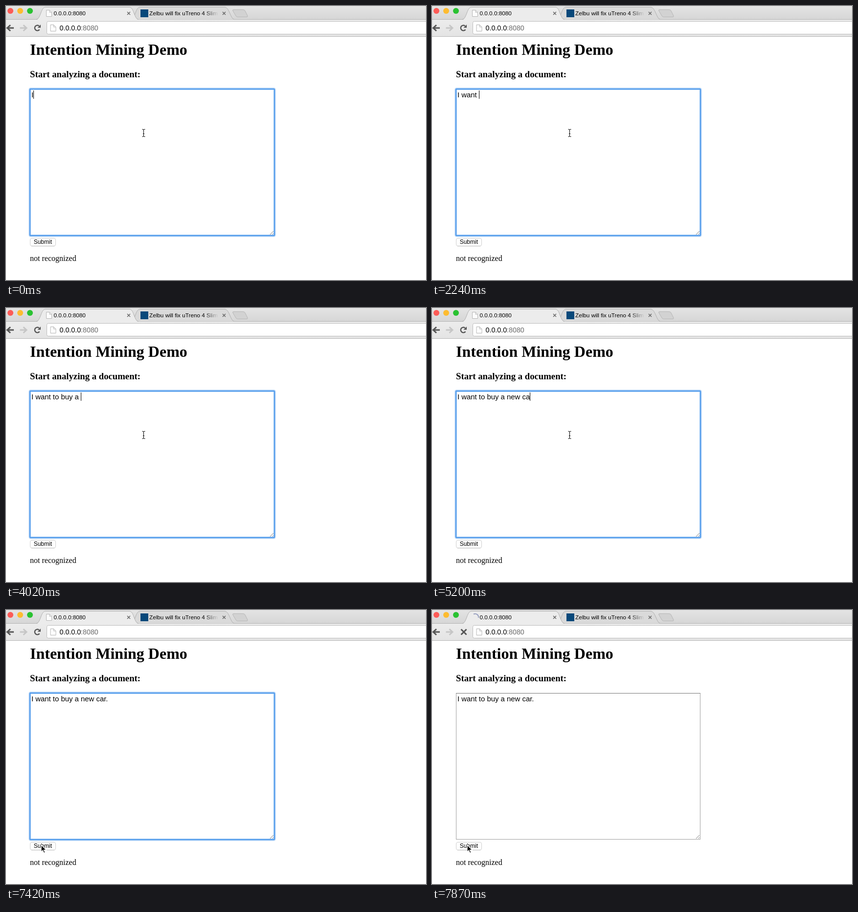
Recreate the animation shown at these times as an HTML page. Size 859 by 561 pixels, loop 8000 ms.

```html
<!DOCTYPE html>
<html lang="en">
<head>
<meta charset="utf-8">
<title>Intention Mining Demo</title>
<style>
  html, body { margin: 0; width: 100%; height: 100%; overflow: hidden; background: #fff; }
  svg { display: block; width: 859px; height: 561px; }
  text { white-space: pre; }
  .sans { font-family: "Liberation Sans", Arial, sans-serif; }
  .serif { font-family: "Liberation Serif", Times, serif; }
  .line { fill: none; }
</style>
</head>
<body>
<svg viewBox="0 0 859 561" xmlns="http://www.w3.org/2000/svg">
  <defs>
    <linearGradient id="strip" x2="0" y2="1">
      <stop offset="0" stop-color="#e4e4e4"/><stop offset="1" stop-color="#d6d6d6"/>
    </linearGradient>
    <linearGradient id="bar" x2="0" y2="1">
      <stop offset="0" stop-color="#ececec"/><stop offset="1" stop-color="#e4e4e4"/>
    </linearGradient>
    <linearGradient id="fade">
      <stop offset="0" stop-color="#dadada" stop-opacity="0"/><stop offset="1" stop-color="#dadada"/>
    </linearGradient>
    <g id="page">
      <path d="M.5 .5H7L11.5 5V13.5H.5Z" fill="#fdfdfd" stroke="#b4b4b4"/>
      <path d="M7 .5V5H11.5" class="line" stroke="#b4b4b4"/>
    </g>
    <path id="close" d="M-3-3L3 3M3-3L-3 3" class="line" stroke="#696969" stroke-width="1.6"/>
    <path id="arrow" d="M9-6L2.5 0L9 6M3 0H16" class="line" stroke-width="3"/>
  </defs>

  <rect width="859" height="561" fill="#fff"/>

  <!-- window and tabs -->
  <rect width="859" height="28" fill="url(#strip)"/>
  <rect y="28" width="859" height="35" fill="url(#bar)"/>
  <path d="M0 27.5H859" stroke="#b3b3b3"/>
  <path d="M0 62.5H859" stroke="#b5b5b5"/>
  <path d="M256 27.5C264 27 265 3 273 2.5H448C457 3 459 27 467 27.5" fill="#dadada" stroke="#b0b0b0"/>
  <path d="M62 28.5C71 27 71 3 80 2.5H253C262 3 262 27 271 28.5Z" fill="#ececec"/>
  <path d="M62 27.5C71 27 71 3 80 2.5H253C262 3 262 27 271 27.5" class="line" stroke="#b0b0b0"/>
  <path d="M465 7.5H485Q488 7.5 489 10L494 20Q495 22.5 492 22.5H474Q471 22.5 470 20L464 10Q463 7.5 465 7.5Z" fill="#d2d2d2" stroke="#b6b6b6"/>
  <circle cx="9" cy="10" r="6" fill="#fc5b57"/>
  <circle cx="29" cy="10" r="6" fill="#fdbc30"/>
  <circle cx="49" cy="10" r="6" fill="#29c231"/>
  <use href="#page" id="tabIcon" x="82" y="8"/>
  <path id="spinner" d="M-3-6.5A7 7 0 0 1 7 1" class="line" stroke="#98a0c0" stroke-width="2"/>
  <use href="#close" x="251" y="15"/>
  <use href="#close" x="446" y="15"/>
  <rect x="275" y="7" width="16" height="16" fill="#08487a"/>
  <g class="sans" font-size="11.75">
    <text x="97.5" y="19">0.0.0.0:8080</text>
    <text x="293" y="19">Zelbu will fix uTreno 4 Slim</text>
  </g>
  <rect x="405" y="6" width="30" height="18" fill="url(#fade)"/>

  <!-- toolbar -->
  <use href="#arrow" x="0" y="45" stroke="#555"/>
  <use href="#arrow" transform="translate(44.5 45) scale(-1 1)" stroke="#c6c6c6"/>
  <g id="reload">
    <path d="M68.5 48.2A5.4 5.4 0 1 1 67.6 40.8" class="line" stroke="#555" stroke-width="2.4"/>
    <path d="M71 38V44.5H64.5Z" fill="#555"/>
  </g>
  <path id="stop" d="M59.5 39.5L70.5 50.5M70.5 39.5L59.5 50.5" stroke="#555" stroke-width="3"/>
  <rect x="83.5" y="31.5" width="790" height="26" rx="3" fill="#fff" stroke="#bcbcbc"/>
  <use href="#page" x="90.5" y="38"/>
  <text class="sans" x="109.5" y="50" font-size="14.25">0.0.0.0<tspan fill="#6b6b6b">:8080</tspan></text>

  <!-- document -->
  <g class="serif">
    <text x="49" y="100" font-size="32" font-weight="bold">Intention Mining Demo</text>
    <text x="49" y="146" font-size="18.72" font-weight="bold">Start analyzing a document:</text>
    <text x="49" y="522" font-size="16">not recognized</text>
  </g>
  <g id="focus" class="line" stroke="#4795ea">
    <rect x="48.5" y="169.5" width="501" height="301" rx="2" stroke-width="5" opacity=".3"/>
    <rect x="49" y="170" width="500" height="300" rx="1" stroke-width="2.4" opacity=".9"/>
  </g>
  <g id="blur" class="line">
    <rect x="49.5" y="170.5" width="499" height="299" stroke="#a0a0a0"/>
    <path d="M49 170.5H549" stroke="#777"/>
  </g>
  <path d="M540 468L547 461M544.5 468L547 465.5" stroke="#777"/>
  <text id="typed" class="sans" x="52" y="187" font-size="14.9"></text>
  <rect id="caret" y="173" width="1" height="17"/>
  <rect x="49.5" y="475.5" width="52" height="16" rx="3.5" fill="none" stroke="#cfcfcf"/>
  <path d="M52 491.5H99" stroke="#b5b5b5"/>
  <rect id="pressed" x="50" y="476" width="51" height="15" rx="3" fill="#d8d8d8"/>
  <text class="sans" x="56.7" y="487" font-size="12">Submit</text>

  <!-- pointers -->
  <path id="beam" d="M-3-7.5H-1.5Q0-7.5 0-6Q0-7.5 1.5-7.5H3M0-6.5V6.5M-3 7.5H-1.5Q0 7.5 0 6Q0 7.5 1.5 7.5H3M-1.5 1.5H1.5" class="line" stroke="#000"/>
  <path id="hand" d="M0 0V14.2L3.3 11.1L5.6 16.5L8 15.5L5.7 10.3H10.2Z" stroke="#fff" stroke-width="1.2"/>
</svg>
<script>
const LOOP = 8000, LINE = "I want to buy a new car.";
const el = id => document.getElementById(id);
const show = (id, on) => el(id).setAttribute("visibility", on ? "visible" : "hidden");
const place = (id, x, y) => el(id).setAttribute("transform", `translate(${x} ${y})`);

// [time, letters typed]
const keys = [[0, 1], [140, 2], [740, 3], [1640, 4], [1790, 5], [1940, 6], [2240, 7],
  [2530, 9], [2680, 10], [2980, 11], [3280, 12], [3430, 13], [3570, 14], [3870, 15],
  [4020, 16], [4310, 17], [4460, 18], [4600, 19], [4900, 20], [5200, 22], [5490, 23], [5940, 24]];

// [from, to] while the caret is hidden
const blinks = [[590, 740], [1340, 1640], [6390, 6990], [7420, LOOP]];

// [time, pointer, x, y]
const moves = [[0, "beam", 281.5, 260], [6390, "beam", 245, 350], [6540, "hand", 104, 548],
  [6690, "", 0, 0], [6840, "hand", 92, 543], [6990, "hand", 80, 509],
  [7130, "hand", 74, 489], [7280, "hand", 72, 482], [7420, "hand", 72, 481]];

const latest = (list, t) => list.filter(k => k[0] <= t).pop();

const typed = el("typed");
typed.textContent = LINE;
const ends = keys.map(([, n]) => typed.getSubStringLength(0, n));

function draw(t) {
  const key = latest(keys, t), focused = t < 7570, loading = t >= 7720;
  const text = LINE.slice(0, key[1]);
  if (typed.textContent !== text) typed.textContent = text;
  el("caret").setAttribute("x", Math.round(52 + ends[keys.indexOf(key)]));
  show("caret", !blinks.some(([a, b]) => t >= a && t < b));

  const [, pointer, x, y] = latest(moves, t);
  for (const id of ["beam", "hand"]) {
    show(id, id === pointer);
    place(id, x, y);
  }

  show("focus", focused);
  show("blur", !focused);
  show("pressed", !focused && !loading);
  show("tabIcon", !loading);
  show("reload", !loading);
  show("spinner", loading);
  show("stop", loading);
  el("spinner").setAttribute("transform", `translate(88 15) rotate(${t < 7870 ? 50 : 0})`);
}

function tick() {
  draw(performance.now() % LOOP);
  requestAnimationFrame(tick);
}
tick();
</script>
</body>
</html>
```
